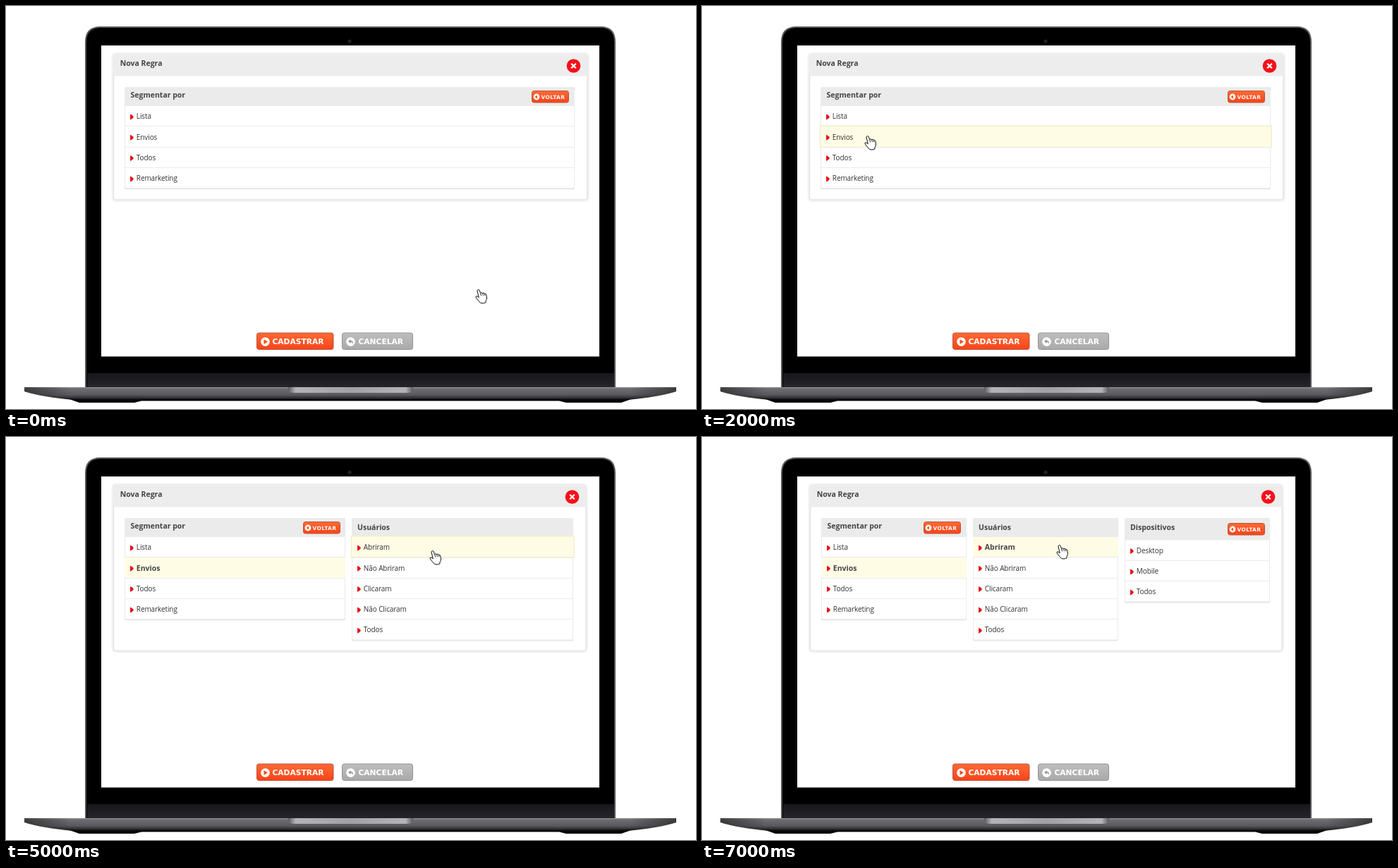
Write an HTML page that moves like this. It is 978x572 px and loops after 8 s.

```html
<!DOCTYPE html>
<html lang="pt">
<head>
<meta charset="utf-8">
<title>Nova Regra</title>
<style>
  html, body { margin: 0; width: 100%; height: 100%; overflow: hidden; background: #fff; }
  svg { display: block; width: 978px; height: 572px; }
  text { font: 10px "Open Sans", "Noto Sans", sans-serif; letter-spacing: -.1px; fill: #333; }
  .bold { font-size: 10.5px; font-weight: 700; letter-spacing: 0; fill: #444; }
  .btn { font: 700 10.7px "DejaVu Sans", sans-serif; letter-spacing: 0; fill: #fff; }
  .back { font-size: 7.4px; letter-spacing: .45px; }
</style>
</head>
<body>
<svg viewBox="0 0 978 572">
  <defs>
    <linearGradient id="orange" x2="0" y2="1"><stop stop-color="#ff6a35"/><stop offset="1" stop-color="#f6441a"/></linearGradient>
    <linearGradient id="gray" x2="0" y2="1"><stop stop-color="#bebebe"/><stop offset="1" stop-color="#a9a9a9"/></linearGradient>
    <linearGradient id="hinge" x2="0" y2="1"><stop stop-color="#17171b"/><stop offset="1" stop-color="#25252a"/></linearGradient>
    <linearGradient id="base" x2="0" y2="1">
      <stop stop-color="#97979b"/><stop offset=".12" stop-color="#6c6c71"/>
      <stop offset=".6" stop-color="#59595e"/><stop offset=".85" stop-color="#303034"/><stop offset="1" stop-color="#050505"/>
    </linearGradient>
    <linearGradient id="ends">
      <stop stop-color="#222" stop-opacity=".65"/><stop offset=".07" stop-color="#222" stop-opacity="0"/>
      <stop offset=".93" stop-color="#222" stop-opacity="0"/><stop offset="1" stop-color="#222" stop-opacity=".65"/>
    </linearGradient>
    <linearGradient id="notch">
      <stop stop-color="#5a5a5e"/><stop offset=".06" stop-color="#b4b4b8"/><stop offset=".5" stop-color="#a2a2a6"/>
      <stop offset=".94" stop-color="#b4b4b8"/><stop offset="1" stop-color="#5a5a5e"/>
    </linearGradient>
  </defs>

  <path d="M113 542V51Q113 30 134 30H843Q863 30 863 51V542Z" fill="#000" stroke="#58585c" stroke-width="2"/>
  <path d="M115 521H862V542H115Z" fill="url(#hinge)"/>
  <circle cx="487" cy="50" r="2.6" fill="#222228"/>
  <path d="M135 56H841V497.500H135Z" fill="#fff"/>
  <path d="M84 556L104 563H182L192 560.500H784L794 563H872L892 556Z" fill="#050505"/>
  <path id="body" d="M26 541H950V547Q925 555 880 559H96Q51 555 26 547Z" fill="url(#base)"/>
  <path d="M26 541H950V547Q925 555 880 559H96Q51 555 26 547Z" fill="url(#ends)"/>
  <path d="M400 541H577V544Q576 549 569 549H408Q401 549 400 544Z" fill="url(#notch)"/>

  <g id="view"></g>

  <g stroke-width="1">
    <rect x="355.500" y="464" width="108.500" height="23.500" rx="3" fill="url(#orange)" stroke="#b9573a"/>
    <rect x="476.500" y="464" width="100" height="23.500" rx="3" fill="url(#gray)" stroke="#949494"/>
  </g>
  <g fill="#fff"><circle cx="367.500" cy="476.500" r="6.300"/><circle cx="488.500" cy="476.500" r="6.300"/></g>
  <path d="M365.500 473L371 476.500L365.500 480Z" fill="#f4501f"/>
  <path d="M488.500 473L485 476L488.500 479V477Q491 476.500 491 480Q493.500 475 488.500 475Z" fill="#999"/>
  <text class="btn" x="377.500" y="479.500">CADASTRAR</text>
  <text class="btn" x="499.500" y="479.500">CANCELAR</text>

  <g id="hand" fill="#fff" stroke="#111" stroke-linejoin="round" stroke-linecap="round">
    <path d="M3 2.500Q4.200 .5 6 2.200L7.500 6.500Q9 5 10.500 6.500Q12 5.500 13.200 7.200Q15 6.500 15.800 9L16.500 13Q16.500 16 15 17.500V19.800Q11 22 7.500 20.500Q5 18 2 14Q0 11.500 1.500 10.800Q3 10.500 5 12.500Z"/>
    <path d="M7.700 7L8.600 10M10.700 7L11.400 9.800M13.400 7.800L13.800 9.800" fill="none" stroke-width=".9"/>
  </g>
  <circle id="dot" r="4" fill="#e3000f"/>
</svg>

<script>
const $ = id => document.getElementById(id);
const STEP = 1000, ROW = 29.3;

const segments = { title: 'Segmentar por', base: 130, rows: ['Lista', 'Envios', 'Todos', 'Remarketing'] };
const users = { title: 'Usuários', rows: ['Abriram', 'Não Abriram', 'Clicaram', 'Não Clicaram', 'Todos'] };
const devices = { title: 'Dispositivos', head: 31.5, rows: ['Desktop', 'Mobile', 'Todos'] };

const views = [
  { x: 152, r: 824.5, b: 275.5, cols: [{ ...segments, x: 168, r: 806, back: 745 }] },
  { x: 152, r: 822.5, b: 304, cols: [
    { ...segments, x: 168, r: 481, back: 421, on: 1 },
    { ...users, x: 490, r: 804 }] },
  { x: 153, r: 822.5, b: 304, cols: [
    { ...segments, x: 169, r: 375, back: 314, on: 1 },
    { ...users, x: 384, r: 590, on: 0 },
    { ...devices, x: 599, r: 805, back: 745, backY: 122 }] }
];

// view, hovered [column, row], hand x and y, click dot
const steps = [
  [0, null, 665, 401],
  [0, null, 278, 292],
  [0, [0, 1], 230, 183],
  [0, [0, 1], 230, 183, [234.5, 185.5]],
  [1, null, 253, 183],
  [1, [1, 0], 600, 160],
  [1, [1, 0], 600, 160, [603.5, 161]],
  [2, null, 502, 152]
];

const rect = (x, y, w, h, attrs) => `<rect x="${x}" y="${y}" width="${w}" height="${h}" ${attrs}/>`;
const text = (x, y, str, cls = '') => `<text x="${x}" y="${y}" class="${cls}">${str}</text>`;

function backButton(x, y) {
  return rect(x + .5, y + .5, 52, 16.5, 'rx="3" fill="url(#orange)" stroke="#bd5434"') +
    `<circle cx="${x + 7}" cy="${y + 9}" r="4.400" fill="#fff"/>` +
    `<path d="M${x + 4.5} ${y + 9}l3.500 -2.500v5z" fill="#ef4f20"/>` +
    text(x + 13.5, y + 11.5, 'VOLTAR', 'btn back');
}

function column(c, hover) {
  const w = c.r - c.x, head = c.head || 27, top = 115 + head;
  const end = top + c.rows.length * ROW;
  let out = rect(c.x, 116, w, end - 115, 'rx="2" fill="#e2e2e2"') +
    rect(c.x + .5, 115.5, w - 1, end - 116, 'rx="2" fill="#fff" stroke="#ebebeb"') +
    rect(c.x, 115, w, head, 'rx="2" fill="#ebebeb"') +
    text(c.x + (c.base ? 8.5 : 8), c.base || 132, c.title, 'bold');
  if (c.back) out += backButton(c.back, c.backY || 120);
  c.rows.forEach((name, i) => {
    const y = top + i * ROW, on = c.on === i;
    if (i) out += rect(c.x, Math.round(y) - 1, w, 1, 'fill="#ebebeb"');
    if (on) out += rect(c.x, Math.round(y), w, 28.5, 'fill="#fffce6"');
    if (hover === i) out += rect(c.x - .5, y - 1.2, w + 1.5, 30.5, 'fill="#fffce5" stroke="#f3eecd" stroke-width="1.500"');
    out += `<path d="M${c.x + 8} ${y + 11.5}q4 1.500 5 4q-1 2.500 -5 4z" fill="#e8101a"/>` +
      text(c.x + 16.8, y + 18.2, name, on ? 'bold' : '');
  });
  return out;
}

function panel(v, hover) {
  const w = v.r - v.x, h = v.b - 68, cx = v.r - 20;
  return rect(v.x - .5, 68, w + 1, h + .5, 'rx="4" fill="none" stroke="#f3f3f3" stroke-width="4"') +
    rect(v.x + .5, 68.5, w - 1, h - 1, 'rx="4" fill="#fff" stroke="#e4e4e4" stroke-width="1.500"') +
    rect(v.x, 68, w, 31.5, 'rx="3" fill="#ededed"') +
    text(v.x + 9.7, 85, 'Nova Regra', 'bold') +
    `<circle cx="${cx}" cy="85" r="9.800" fill="#f5101a"/>` +
    `<path d="M${cx - 3.3} 81.700l6.600 6.600m0 -6.600l-6.600 6.600" stroke="#fff" stroke-width="2.300"/>` +
    v.cols.map((c, i) => column(c, hover && hover[0] === i ? hover[1] : -1)).join('');
}

let shown = -1;
function show(now) {
  const n = Math.floor(now / STEP) % steps.length;
  if (n !== shown) {
    shown = n;
    const [view, hover, x, y, dot] = steps[n];
    $('view').innerHTML = panel(views[view], hover);
    $('hand').setAttribute('transform', `translate(${x} ${y})`);
    $('dot').setAttribute('visibility', dot ? 'visible' : 'hidden');
    if (dot) $('dot').setAttribute('transform', `translate(${dot})`);
  }
}

const start = performance.now();
function tick() {
  show(performance.now() - start);
  requestAnimationFrame(tick);
}
tick();
</script>
</body>
</html>
```
